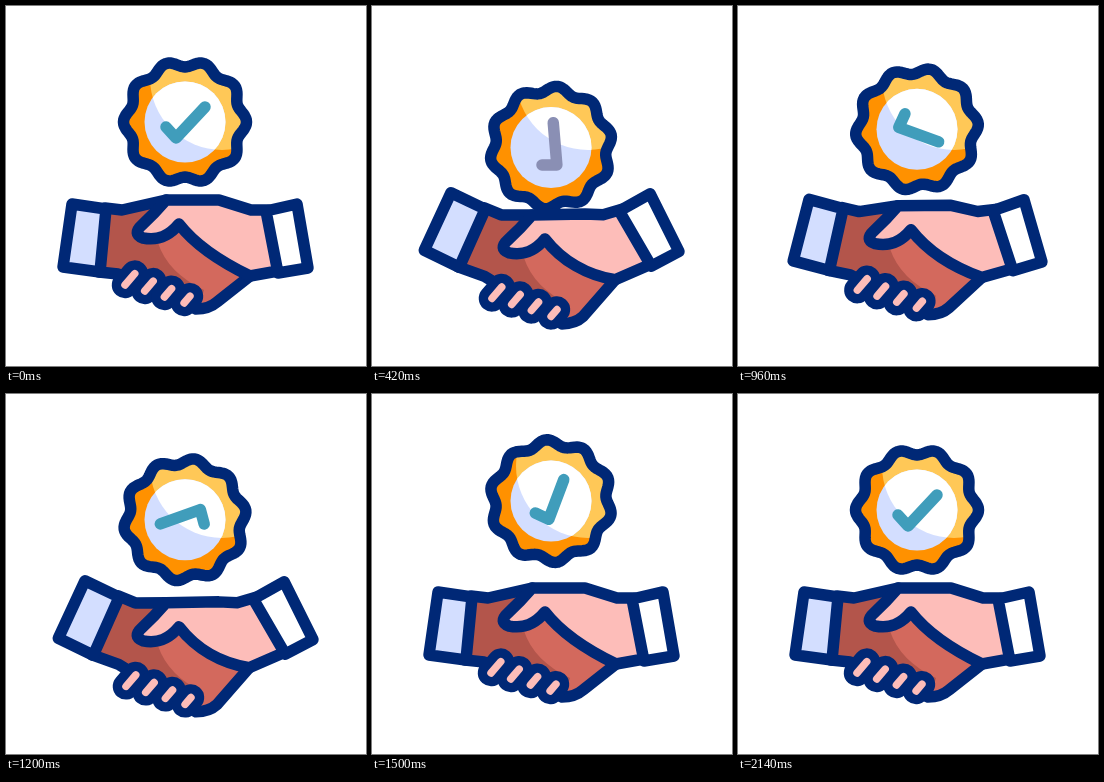
These frames come from a looping animation (360x360 px, 2400 ms). An HTML page with a canvas:

```html
<!DOCTYPE html>
<html lang="en">
<head>
<meta charset="utf-8">
<title>Handshake</title>
<style>
html, body { margin: 0; width: 100%; height: 100%; overflow: hidden; background: #fff; }
canvas { display: block; width: 100vmin; height: 100vmin; }
</style>
</head>
<body>
<canvas id="stage"></canvas>
<script>
const LOOP = 2400, SIZE = 360, MID = 180, LINE = 11.5;
const NAVY = '#002876', ORANGE = '#ff9100', YELLOW = '#ffc857', LILAC = '#d3deff',
      BROWN = '#b3554b', CLAY = '#d3695d', PINK = '#fdbdb9';
const canvas = document.getElementById('stage');
const ctx = canvas.getContext('2d');

const mix = (a, b, u) => a + (b - a) * u;
const ramp = (a, b, v) => Math.min(1, Math.max(0, (v - a) / (b - a)));
const sine = u => (1 - Math.cos(Math.PI * u)) / 2;
const smoother = u => u * u * u * (u * (6 * u - 15) + 10);

// Eased value through [time, value] keys
function track(keys, t) {
  return keys.reduce((v, [time, next], i) =>
    i ? mix(v, next, sine(ramp(keys[i - 1][0], time, t))) : next, 0);
}

const HEIGHT = [[0, 116], [400, 142], [730, 96.5], [1090, 134], [1405, 104], [1800, 126.5], [2140, 116]];
const DIP = [[0, 0], [400, 1], [800, 0], [1180, 1], [1510, 0]];

// A small wind-up backwards, then a full turn forwards
const spin = t => (408 * smoother(ramp(480, 1750, t)) - 48 * sine(ramp(0, 430, t))) * Math.PI / 180;

function paint(fill, line) {
  if (fill) {
    ctx.fillStyle = fill;
    ctx.fill();
  }
  if (line) {
    ctx.strokeStyle = NAVY;
    ctx.lineWidth = line;
    ctx.stroke();
  }
}

function disc(x, y, r, color) {
  ctx.beginPath();
  ctx.arc(x, y, r, 0, 7);
  paint(color);
}

// Fills the current path's area with a highlight that stays in place
function shine(color) {
  ctx.save();
  ctx.clip();
  disc(216, 72, 72, color);
  ctx.restore();
}

function scallop(y, turn) {
  ctx.beginPath();
  for (let a = 0; a < 2 * Math.PI; a += Math.PI / 90) {
    const r = 58.3 + 3.2 * Math.cos(10 * a);
    ctx.lineTo(179 + r * Math.cos(a + turn), y + r * Math.sin(a + turn));
  }
  ctx.closePath();
}

function badge(t) {
  const y = track(HEIGHT, t), turn = spin(t);
  scallop(y, turn);
  paint(ORANGE);
  shine(YELLOW);
  disc(179, y, 40.5, LILAC);
  shine('#fff');
  scallop(y, turn);
  paint(null, LINE);

  // The tick dulls as the badge sinks low
  const dull = ramp(134, 141, y);
  ctx.save();
  ctx.translate(179, y);
  ctx.rotate(turn);
  ctx.beginPath();
  ctx.moveTo(-19, 5);
  ctx.lineTo(-9, 16);
  ctx.lineTo(20, -15);
  ctx.strokeStyle = `rgb(${mix(64, 138, dull)}, ${mix(157, 143, dull)}, ${mix(187, 180, dull)})`;
  ctx.lineWidth = LINE;
  ctx.stroke();
  ctx.restore();
}

// The grip drops while the arms swing up around it
function bend(x, y, u, rightOnly) {
  const side = Math.sign(x - MID), d = Math.abs(x - MID);
  if (rightOnly && side < 0) return [x, y + 15 * u];
  const turn = 0.29 * u * sine(ramp(40, 80, d));
  const pivot = mix(270, 232, sine(ramp(60, 90, d)));
  const drop = u * (15 - 0.33 * Math.max(0, d - 30));
  const v = y - pivot;
  return [MID + side * (d * (1 - turn / 10) + v * Math.sin(turn)),
          pivot + v * Math.cos(turn) + drop];
}

// Two numbers make a line, four or six a curve
function shape(parts, u, rightOnly) {
  ctx.beginPath();
  parts.forEach((part, i) => {
    const p = [];
    for (let k = 0; k < part.length; k += 2) p.push(...bend(part[k], part[k + 1], u, rightOnly));
    if (!i) ctx.moveTo(...p);
    else if (p.length === 2) ctx.lineTo(...p);
    else if (p.length === 4) ctx.quadraticCurveTo(...p);
    else ctx.bezierCurveTo(...p);
  });
  ctx.closePath();
}

const BODY = [[160, 194], [116, 204], [99, 202], [93, 266], [112, 268], [190, 303],
              [203, 303, 211, 296], [244, 270], [173, 218]];
const PALM = [[152, 237], [173, 218], [244, 270], [211, 296], [203, 303, 192, 303], [198, 284], [162, 267, 152, 237]];
const GRIP = [[160, 194], [213, 194], [245, 204], [262, 204], [272, 265], [244, 270],
              [215, 256, 190, 240, 173, 218], [163, 230, 152, 235, 137, 232],
              [126, 228, 136, 219], [148, 208, 160, 194]];
const CUFFS = [[LILAC, [[66, 198], [100, 203], [94, 266], [57, 261]]],
               ['#fff', [[291, 198], [302, 262], [272, 267], [260, 205]]]];

function fingers(u) {
  for (const [color, width] of [[NAVY, 26.5], [PINK, 7.5]]) {
    ctx.strokeStyle = color;
    ctx.lineWidth = width;
    for (let i = 0; i < 4; i++) {
      const x = 119 + 19.7 * i + u, y = 279 + 6 * i + 13.5 * u, size = 15 - 2 * i;
      ctx.beginPath();
      ctx.moveTo(x, y);
      ctx.lineTo(x + 0.65 * size, y - 0.76 * size);
      ctx.stroke();
    }
  }
}

function hands(u) {
  shape(BODY, u);
  paint(BROWN);
  shape(PALM, u);
  paint(CLAY);
  shape(BODY, u);
  paint(null, LINE);
  shape(GRIP, u, true);
  paint(PINK, LINE);
  for (const [color, cuff] of CUFFS) {
    shape(cuff, u);
    paint(color, LINE);
  }
  fingers(u);
}

function draw(t) {
  const scale = canvas.width / SIZE;
  ctx.setTransform(scale, 0, 0, scale, 0, 0);
  ctx.fillStyle = '#fff';
  ctx.fillRect(0, 0, SIZE, SIZE);
  ctx.lineJoin = ctx.lineCap = 'round';
  badge(t);
  hands(track(DIP, t));
}

function resize() {
  const side = Math.min(innerWidth, innerHeight) || SIZE;
  canvas.width = canvas.height = Math.round(side * (devicePixelRatio || 1));
}

const start = performance.now();
function frame() {
  draw((performance.now() - start) % LOOP);
  requestAnimationFrame(frame);
}
addEventListener('resize', resize);
resize();
frame();
</script>
</body>
</html>
```
